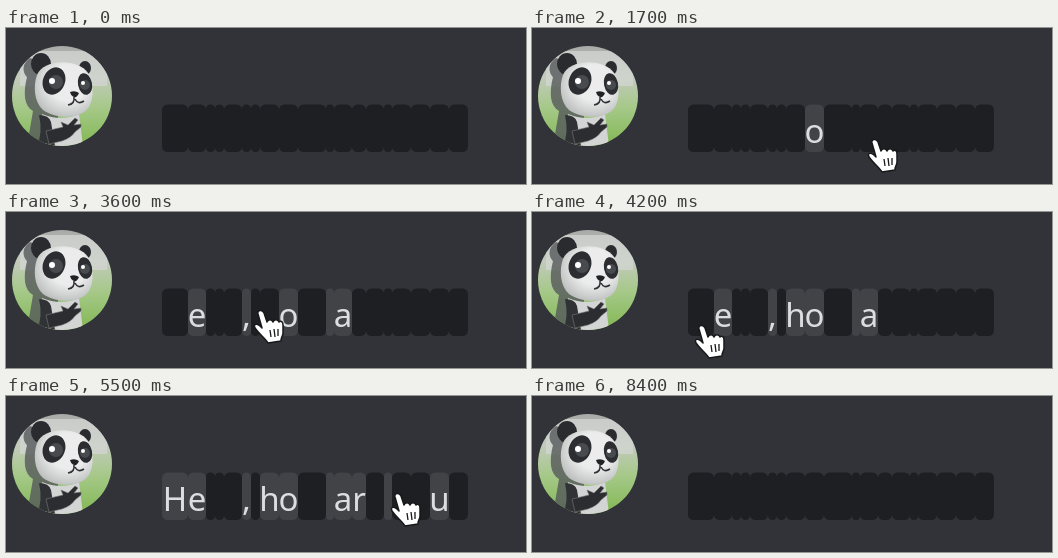
These frames come from a looping animation (520x156 px, 8500 ms). An HTML page:

```html
<!DOCTYPE html>
<html lang="en">
<head>
<meta charset="utf-8">
<title>Spoiler message</title>
<style>
html, body { margin: 0; width: 100%; height: 100%; overflow: hidden; background: #313338; }
svg { display: block; width: 520px; height: 156px; }
.letter { font: 33px "Noto Sans", "Open Sans", sans-serif; fill: #dbdee1; text-anchor: middle; }
</style>
</head>
<body>
<svg viewBox="0 0 520 156">
  <defs>
    <linearGradient id="meadow" x1="0" y1="0" x2="0" y2="1">
      <stop offset="0" stop-color="#a6aaa7"/>
      <stop offset=".3" stop-color="#c3cbbd"/>
      <stop offset=".62" stop-color="#a5c888"/>
      <stop offset="1" stop-color="#82b853"/>
    </linearGradient>
    <radialGradient id="fur" cx=".58" cy=".38" r=".65">
      <stop offset=".5" stop-color="#ececec"/>
      <stop offset="1" stop-color="#bdbfbf"/>
    </radialGradient>
    <clipPath id="round"><circle cx="56" cy="68" r="50"/></clipPath>
  </defs>

  <g clip-path="url(#round)">
    <rect x="6" y="18" width="100" height="100" fill="url(#meadow)"/>
    <path d="M14 23H94Q101 24 101 32V58H14Z" fill="#d3d6d3" opacity=".75"/>
    <path d="M24 30C15 36 17 45 21 49C17 65 18 78 27 83L22 112L35 118L52 100V40Z" fill="#55595a" opacity=".8"/>
    <path d="M36 86Q55 94 73 86L77 118H38Z" fill="#d3d5d4"/>
    <path d="M33 87Q43 87 45 94L49 118H31Q37 105 33 87Z" fill="#303235"/>
    <ellipse cx="35" cy="36" rx="10" ry="11" fill="#292b2e"/>
    <ellipse cx="79" cy="40" rx="6" ry="7" fill="#292b2e"/>
    <path d="M31 47C37 31 72 30 82 45C88 54 88 70 83 79C75 92 49 91 37 82C28 74 27 58 31 47Z" fill="url(#fur)"/>
    <ellipse cx="48" cy="53" rx="11" ry="14" transform="rotate(22 48 53)" fill="#2b2d30"/>
    <ellipse cx="79" cy="56" rx="7" ry="11" transform="rotate(-12 79 56)" fill="#2b2d30"/>
    <circle cx="50" cy="54" r="7" fill="#484b4e"/>
    <circle cx="79" cy="57" r="5" fill="#484b4e"/>
    <circle cx="46" cy="53" r="3" fill="#fff"/>
    <circle cx="77" cy="55" r="2" fill="#fff"/>
    <path d="M64 64Q69 62 73 65Q71 70 68 69Q65 68 64 64Z" fill="#202225"/>
    <path d="M68 69Q69 76 62 77M69 71Q72 77 78 73" fill="none" stroke="#303235" stroke-width="1.6"/>
    <path d="M40 103L57 99L55 94L62 97L69 90L72 92L68 97L75 96L75 99L69 104Q65 110 56 113L43 116Z" fill="#2b2d30" stroke="#777b7b" stroke-width=".6"/>
  </g>

  <g id="message"></g>

  <g id="cursor">
    <path d="M-3 3C-4-1 1-2 3 2L6 11C7 8 11 8 12 11C13 8 17 8 18 11C20 9 22 11 22 14V22C22 25 20 26 20 30L7 32C5 28-2 23-6 17C-8 13-4 12-1 15L1 17Z"
      fill="#fff" stroke="#17181a" stroke-width="1.5" stroke-linejoin="round"/>
    <path d="M9 19L10 26M13 18L14 26M17 18V25" fill="none" stroke="#17181a" stroke-width="1.3"/>
  </g>
</svg>
<script>
const LOOP = 8500, TICK = 100, RESET = 7800;
const text = "Hello, how are you?";
const edges = [156, 182, 200, 209, 218, 236, 245, 254, 273, 292, 320, 328, 346, 360, 378, 386, 405, 424, 443, 462];

// Character index -> time its spoiler opens
const openAt = { 8: 1200, 10: 1800, 11: 1800, 5: 2900, 1: 3200, 7: 3700, 0: 4300, 17: 4900, 12: 5200, 14: 5400 };

// Fingertip path: time, x, y
const path = [
  [500, 306, 146], [700, 304, 124], [900, 291, 109], [1200, 284, 109], [1400, 286, 110],
  [1700, 343, 112], [1900, 341, 112], [2200, 318, 112], [2500, 280, 115], [2800, 236, 116],
  [2900, 239, 114], [3100, 196, 108], [3300, 193, 107], [3600, 255, 99], [3800, 261, 101],
  [4000, 215, 107], [4200, 170, 114], [4400, 170, 115], [4800, 427, 111], [4900, 427, 111],
  [5000, 422, 113], [5200, 354, 115], [5400, 382, 109], [5500, 392, 98], [5700, 461, 14]
];

const message = document.getElementById("message");
const cursor = document.getElementById("cursor");

function add(name, attributes, content = "") {
  const node = document.createElementNS("http://www.w3.org/2000/svg", name);
  for (const key in attributes) node.setAttribute(key, attributes[key]);
  node.textContent = content;
  return message.appendChild(node);
}

const cells = [...text].map((char, i) => {
  const x = edges[i], width = edges[i + 1] - x;
  const box = add("rect", { x, y: 76.5, width, height: 47.5, rx: Math.min(5.5, width / 2) });
  const letter = add("text", { x: x + width / 2, y: 115, class: "letter" }, char);
  return { box, letter, time: openAt[i] ?? Infinity };
});

function cursorAt(time) {
  const next = path.findIndex(point => point[0] >= time);
  if (next < 0 || time < path[0][0]) return null;
  if (next === 0) return path[0].slice(1);
  const [t0, x0, y0] = path[next - 1], [t1, x1, y1] = path[next];
  const p = (time - t0) / (t1 - t0);
  return [x0 + (x1 - x0) * p, y0 + (y1 - y0) * p];
}

function draw(now) {
  const time = Math.floor((now % LOOP) / TICK) * TICK;
  for (const { box, letter, time: opening } of cells) {
    const open = time >= opening && time < RESET;
    box.setAttribute("fill", open ? "#414347" : "#1e1f22");
    letter.setAttribute("visibility", open ? "visible" : "hidden");
  }
  const tip = cursorAt(time);
  cursor.setAttribute("visibility", tip ? "visible" : "hidden");
  if (tip) cursor.setAttribute("transform", `translate(${tip})`);
}

const start = performance.now();
function frame(now) {
  draw(Math.max(0, now - start));
  requestAnimationFrame(frame);
}
frame(start);
</script>
</body>
</html>
```
